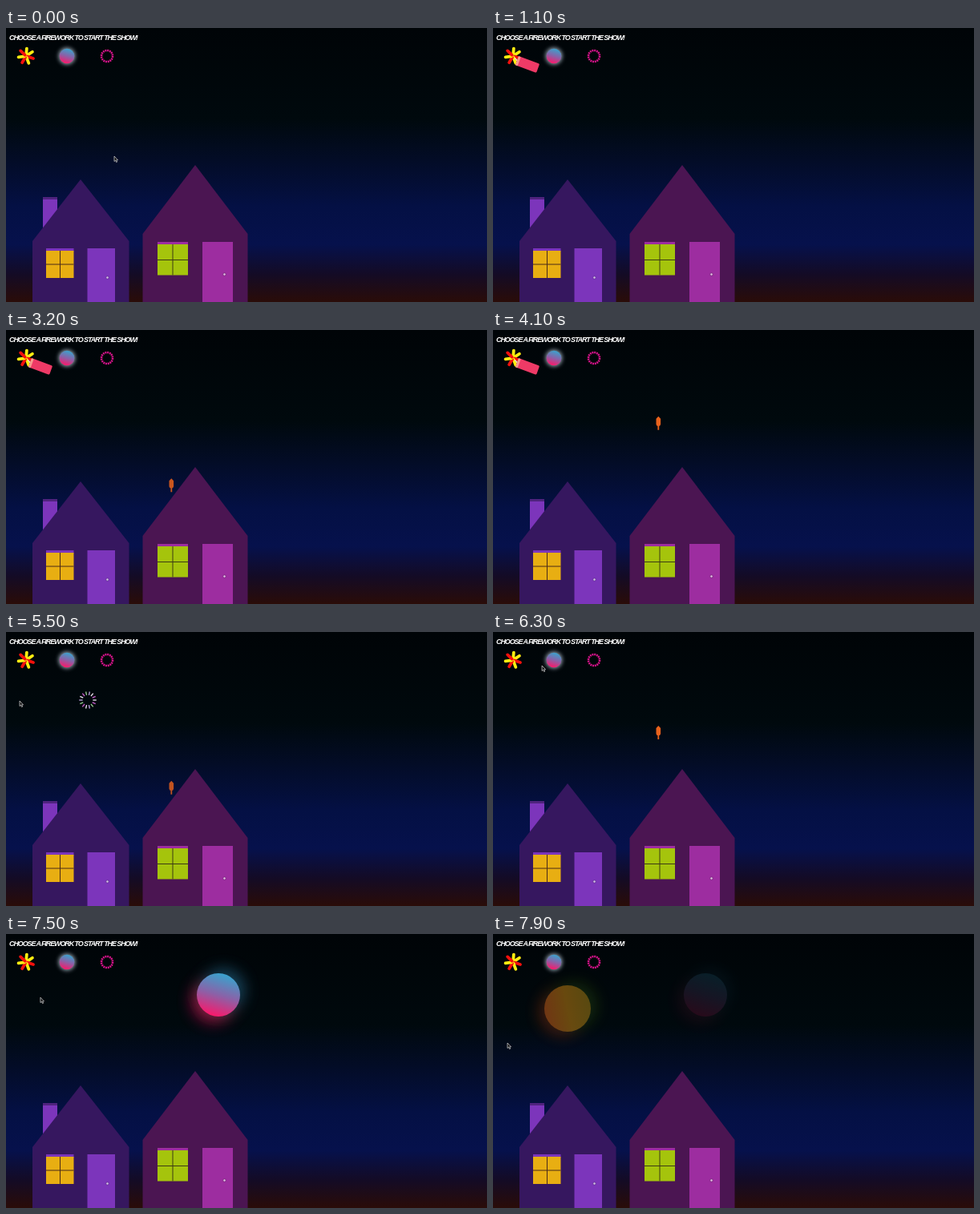
These frames come from a looping animation (600 px wide and 342 px high, 8000 ms). An HTML page:

```html
<!DOCTYPE html>
<html lang="en">
<meta charset="utf-8">
<title>Firework show</title>
<style>
  html, body { margin: 0; width: 100%; height: 100%; overflow: hidden; background: #000508; }
  svg { display: block; width: 600px; height: 342px; }
  text { font: italic 700 9px "Liberation Sans", Arial, sans-serif; letter-spacing: -1.1px; fill: #fff; }
</style>
<svg viewBox="0 0 600 342">
  <defs>
    <linearGradient id="sky" x2="0" y2="1">
      <stop offset="0" stop-color="#000407"/>
      <stop offset=".33" stop-color="#00090d"/>
      <stop offset=".48" stop-color="#030c26"/>
      <stop offset=".65" stop-color="#041044"/>
      <stop offset=".79" stop-color="#06114c"/>
      <stop offset=".9" stop-color="#140b25"/>
      <stop offset="1" stop-color="#2a0c08"/>
    </linearGradient>
    <linearGradient id="cool" x1=".65" y1="0" x2=".35" y2="1">
      <stop offset=".05" stop-color="#3d9fcb"/>
      <stop offset=".5" stop-color="#8a62a8"/>
      <stop offset="1" stop-color="#ff1568"/>
    </linearGradient>
    <linearGradient id="warm" x1="0" y1=".6" x2="1" y2=".4">
      <stop offset="0" stop-color="#e0641c"/>
      <stop offset=".5" stop-color="#d08a12"/>
      <stop offset="1" stop-color="#b08a16"/>
    </linearGradient>
    <filter id="blur" x="-1" y="-1" width="3" height="3"><feGaussianBlur stdDeviation="9"/></filter>
    <filter id="halo" x="-1" y="-1" width="3" height="3"><feGaussianBlur stdDeviation="2.5"/></filter>
  </defs>

  <rect width="600" height="342" fill="url(#sky)"/>

  <g id="sphereA">
    <g filter="url(#blur)" opacity=".6">
      <circle cx="-6" cy="7" r="28" fill="#e01058"/>
      <circle cx="6" cy="-6" r="27" fill="#28698c"/>
    </g>
    <circle r="27" fill="url(#cool)"/>
  </g>
  <g id="sphereB">
    <g filter="url(#blur)" opacity=".6">
      <circle cx="-6" cy="4" r="30" fill="#d03c10"/>
      <circle cx="8" cy="-4" r="29" fill="#3c6c10"/>
    </g>
    <circle r="29" fill="url(#warm)"/>
  </g>
  <g id="burst" stroke-width="1.4"></g>

  <g fill="#7c35bb">
    <path d="M46 211h18v50h-18z"/>
    <path d="M46 211h18v3h-18z" fill="#4f237e"/>
    <path d="M33 342V266L93 189L153.500 266V342z" fill="#36175f"/>
    <path d="M50 275h34.500v4h-34.500zM101.500 275h34.500v67h-34.500z"/>
    <path d="M50 278h34.500v34h-34.500z" fill="#e8ae12"/>
    <path d="M67.500 278v34M50 295h34.500" stroke="#4a2a18"/>
    <circle cx="126.500" cy="311.500" r="1.700" fill="#d0b8e4" stroke="#4d2080" stroke-width=".6"/>
  </g>
  <g fill="#9d2da0">
    <path d="M170.500 342V257L236 171L301.500 257V342z" fill="#4b1552"/>
    <path d="M189 267h38v4h-38zM245 267h38v75h-38z"/>
    <path d="M189 270h38v38.500h-38z" fill="#a5c40c"/>
    <path d="M208 270v38.500M189 289.500h38" stroke="#3c3a14"/>
    <circle cx="272.500" cy="307.500" r="1.700" fill="#e4b8e4" stroke="#5d1860" stroke-width=".6"/>
  </g>

  <g id="rocket">
    <path d="M0 -17L2.800 -14V-7L1.800 -5H.9V0H-.9V-5H-1.800L-2.800 -7V-14z" fill="#e8621c"/>
  </g>

  <text x="4" y="15">CHOOSE A FIREWORK TO START THE SHOW!</text>
  <g id="star" transform="translate(25 35)" stroke-width="3.800" stroke-linecap="round"></g>
  <g transform="translate(76 35)">
    <circle r="10.500" fill="#c4d4e4" opacity=".75" filter="url(#halo)"/>
    <circle r="9.300" fill="url(#cool)"/>
  </g>
  <circle cx="126" cy="35" r="7" fill="none" stroke="#dc148f" stroke-width="2.600" stroke-dasharray="1.900 .849"/>

  <g id="stick">
    <path d="M1 2Q3 2 4 5" stroke="#f4e4c4" stroke-width="1.500" fill="none"/>
    <g transform="translate(17 9.500) rotate(20)">
      <rect x="-14" y="-6" width="28" height="12" rx="1.500" fill="#ee3a66"/>
      <rect x="-14" y="-6" width="3" height="12" rx="1" fill="#f79a8c"/>
    </g>
  </g>
  <path id="arrow" d="M0 0V6.500L1.500 5.200L2.600 7.600L3.700 7.100L2.600 4.800H4.500z" fill="#111" stroke="#ddd" stroke-width=".7"/>
</svg>
<script>
  const LOOP = 8000;
  const $ = id => document.getElementById(id);
  const clamp = v => Math.max(0, Math.min(1, v));
  const TAU = Math.PI * 2;

  // Pointer stops: time, x, y
  const stops = [
    [0, 135, 160], [100, 135, 160], [200, 109, 143], [400, 109, 143], [500, 62, 66], [700, 62, 66],
    [1000, 26, 36], [4400, 26, 36], [4600, 17, 52], [5500, 17, 86], [5700, 17, 86],
    [6300, 61, 42], [6500, 74, 36], [6900, 74, 36], [7500, 43, 79], [7900, 18, 136], [8000, 18, 136]
  ];

  // Ray from the centre of a group
  function ray(group, angle, inner, outer, color) {
    const c = Math.cos(angle), s = Math.sin(angle);
    group.insertAdjacentHTML('beforeend',
      `<line x1="${c * inner}" y1="${s * inner}" x2="${c * outer}" y2="${s * outer}" stroke="${color}"/>`);
  }
  [...'yyryryr'].forEach((c, i) =>
    ray($('star'), -1.48 + i * TAU / 7, 2, 9.5, c === 'y' ? '#ffee10' : '#f5100c'));
  const rayColors = ['#e8e0ee', '#c45cc8', '#8fc48a', '#b49ad8'];
  for (let i = 0; i < 14; i++) ray($('burst'), i * TAU / 14, 6.5, 11, rayColors[i % 4]);

  function place(id, x, y, opacity = 1, scale = 1) {
    $(id).setAttribute('transform', `translate(${x} ${y}) scale(${scale})`);
    $(id).setAttribute('opacity', opacity);
  }

  function pointer(t) {
    const i = stops.findIndex(s => s[0] > t);
    const [t0, x0, y0] = stops[i - 1], [t1, x1, y1] = stops[i];
    const p = (t - t0) / (t1 - t0);
    return [x0 + (x1 - x0) * p, y0 + (y1 - y0) * p];
  }

  function draw(t) {
    const [x, y] = pointer(t);
    const hover = t >= 900 && t < 4450 || t >= 6500 && t < 6950;
    place('arrow', x, y, hover ? 0 : 1);
    place('stick', x, y, hover ? 1 : 0);

    const flight = t < 5360 ? t - 3053 : t - 5360;
    const flying = flight >= 0 && flight < 1550 && t < 6600;
    place('rocket', 206.3, 215 - flight * .086, flying ? clamp(flight / 170) : 0);

    const second = t >= 5280;
    const p = (t - (second ? 5280 : 4620)) / 560;
    const q = clamp(p);
    place('burst', second ? 102 : 206, second ? 85 : 80,
      p > 0 && p < 1 ? clamp((1 - p) * 2) : 0, 17 * (1 - (1 - q) ** 2) / 11);

    place('sphereA', 265, 76, Math.min(clamp((t - 6750) / 550), clamp((7970 - t) / 440)));
    place('sphereB', 93, 93, clamp((t - 7600) / 600));
  }

  function tick() {
    draw(performance.now() % LOOP);
    requestAnimationFrame(tick);
  }
  tick();
</script>
</html>
```
